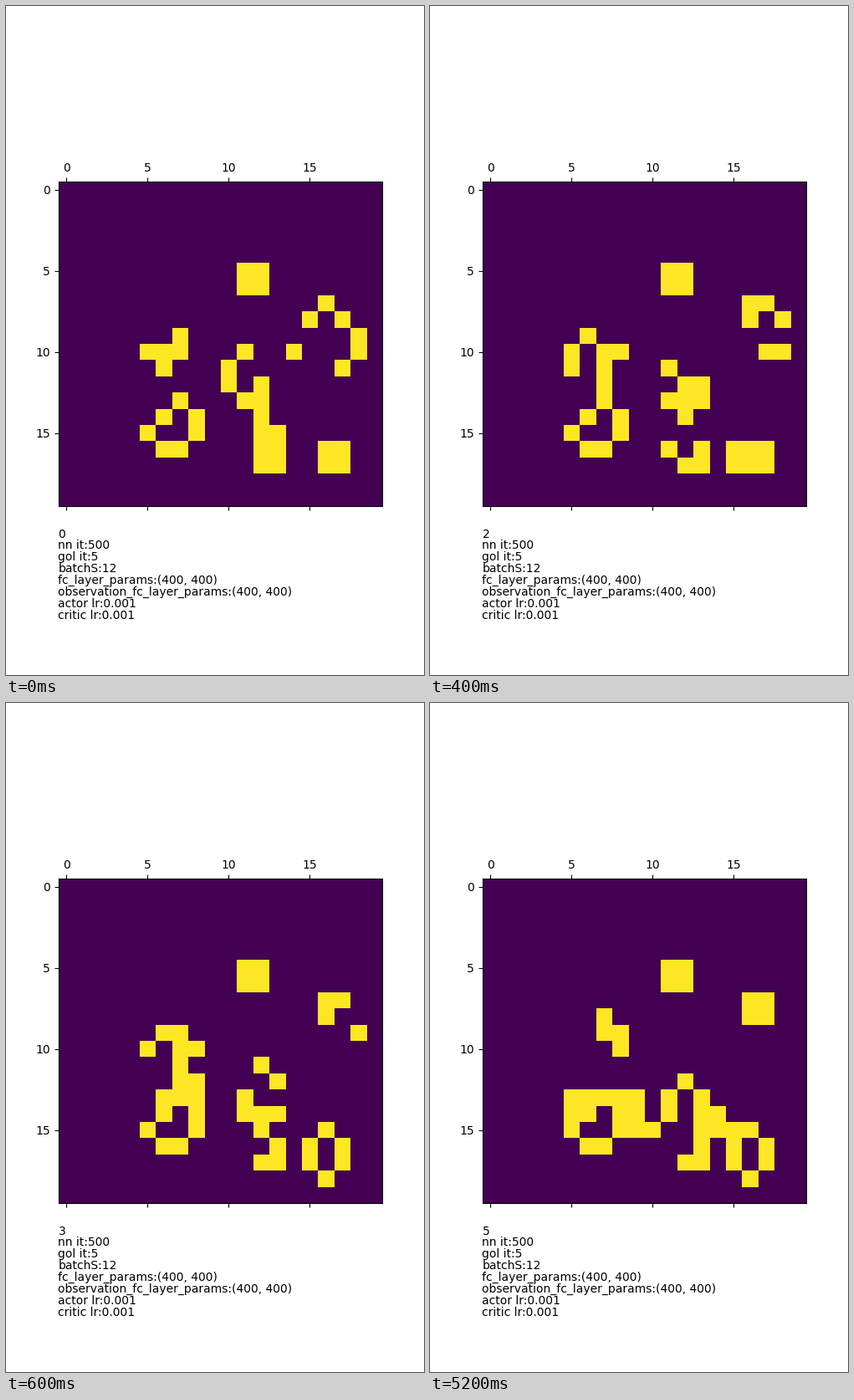
A matplotlib script for the animation above (8 s loop, 500 by 800 pixels).

```python
import matplotlib.pyplot as plt
import numpy as np
from matplotlib.animation import FuncAnimation

W, H, DPI = 500, 800, 100
SIZE = 20
STEP_MS, LOOP_MS = 200, 8000
LAST_GEN = 5
LINE_PX = 14

# Start pattern, first row of the block is grid row 5
TOP = 5
SEED = """
...........##.......
...........##.......
................#...
...............#.#..
.......#..........#.
.....###...#..#...#.
......#...#......#..
..........#.#.......
.......#...##.......
......#.#...#.......
.....#..#...##......
......##....##..##..
............##..##..
""".split()

PARAMS = [
    "nn it:500",
    "gol it:5",
    "batchS:12",
    "fc_layer_params:(400, 400)",
    "observation_fc_layer_params:(400, 400)",
    "actor lr:0.001",
    "critic lr:0.001",
]


def start_grid():
    grid = np.zeros((SIZE, SIZE), int)
    for r, line in enumerate(SEED):
        grid[TOP + r] = [c == "#" for c in line]
    return grid


def evolve(grid):
    """One step of Conway's rules."""
    near = sum(
        np.roll(grid, (dy, dx), (0, 1))
        for dy in (-1, 0, 1)
        for dx in (-1, 0, 1)
        if dx or dy
    )
    return ((near == 3) | ((grid == 1) & (near == 2))).astype(int)


def put_text(text, y):
    """Text at the left edge of the axes, baseline y pixels from the top."""
    return fig.text(0.125, 1 - y / H, text, fontsize=10, family="DejaVu Sans")


generations = [start_grid()]
for _ in range(LAST_GEN):
    generations.append(evolve(generations[-1]))

plt.rcParams["font.family"] = "DejaVu Sans"
plt.rcParams["savefig.dpi"] = DPI
fig, ax = plt.subplots(figsize=(W / DPI, H / DPI), dpi=DPI)
board = ax.matshow(generations[0], cmap="viridis", vmin=0, vmax=1)

counter = put_text("0", 636)
for k, line in enumerate(PARAMS):
    put_text(line, 649 + LINE_PX * k)


def update(frame):
    gen = min(frame, LAST_GEN)
    board.set_data(generations[gen])
    counter.set_text(str(gen))
    return board, counter


anim = FuncAnimation(
    fig, update, frames=LOOP_MS // STEP_MS, interval=STEP_MS,
    repeat=True, repeat_delay=0, blit=False,
)
plt.show()
```
